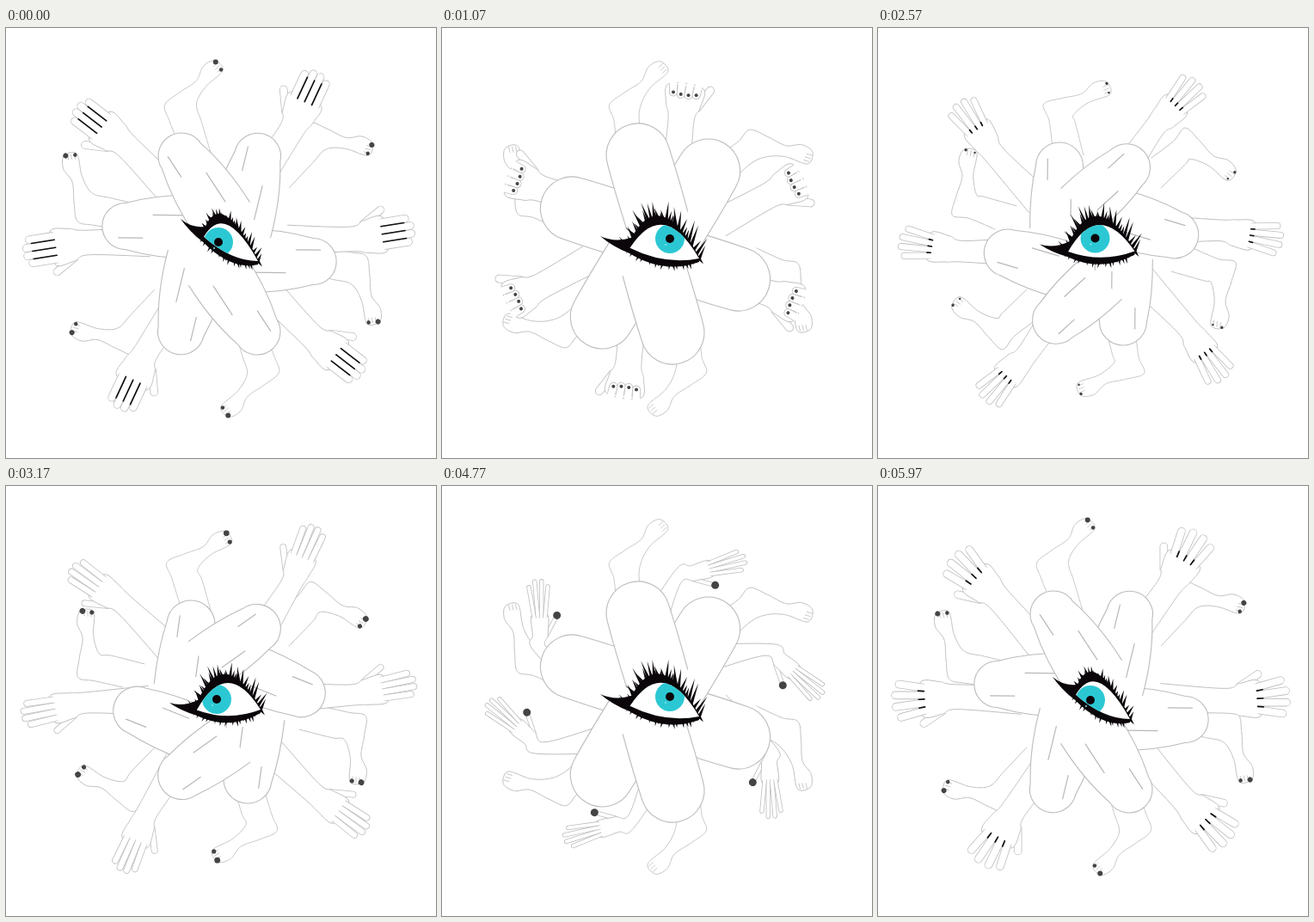
These frames come from a looping animation (500x500 px, 6.07 s). An HTML page with a canvas:

```html
<!DOCTYPE html>
<html lang="en">
<head>
<meta charset="utf-8">
<title>Eye mandala</title>
<style>
  html, body { margin: 0; height: 100%; overflow: hidden; background: #fff; }
  canvas { display: block; width: 100vw; height: 100vh; }
</style>
</head>
<body>
<canvas id="stage" width="500" height="500"></canvas>
<script>
const ctx = document.getElementById('stage').getContext('2d');
const LOOP = 6070, FIRST = 70, STEP = 100, ARM_CYCLE = 30.5;
const INK = '#0a060a', RAD = Math.PI / 180;

// Legs: heel position, foot angle, knee circle, and how far the hip has swung over.
const bent = { heel: 186, foot: -35, x: 204, y: 149, r: 27, swing: 0, nail: 3, crease: 1 };
const plump = { heel: 196, foot: -34, x: 228, y: 148, r: 37, swing: 0, nail: 0, crease: 0 };
const sole = { heel: 201, foot: -5, x: 207, y: 160, r: 27, swing: .8, nail: 0, crease: 1 };
const turned = { heel: 189, foot: -21, x: 215, y: 161, r: 28, swing: 1, nail: 3.4, crease: 1 };
const wide = { heel: 198, foot: -32, x: 199, y: 163, r: 33, swing: 1, nail: 2.8, crease: 1 };
const legKeys = [[0, bent], [11, plump], [20, sole], [32, turned], [40, wide], [48, plump], [60, bent]];

// Hands: wrist, direction, finger length, half width, spread, thumb side, dark gaps.
const back = { x: 335, y: 112, dir: -65, len: 34, half: 19, spread: 0, thumb: -1, gap: 1 };
const flat = { x: 333, y: 110, dir: -67, len: 37, half: 15, spread: 2, thumb: -1, gap: 0 };
const fist = { x: 279, y: 100, dir: -82, len: -9, half: 20, spread: 5, thumb: 1, gap: 0 };
const reach = { x: 279, y: 98, dir: -83, len: 42, half: 15, spread: 4, thumb: 1, gap: 0 };
const side = { x: 282, y: 104, dir: -15, len: 44, half: 9, spread: 5, thumb: 1, gap: 0 };
const slim = { x: 300, y: 111, dir: -25, len: 38, half: 9, spread: 4, thumb: 1, gap: 0 };
const palm = { x: 341, y: 112, dir: -60, len: 34, half: 19, spread: 8, thumb: -1, gap: .25 };
const armKeys = [[0, back], [1.5, flat], [9.5, fist], [11, fist], [14, reach],
  [17.5, side], [20, slim], [29.5, palm], [ARM_CYCLE, back]];

// Eye: wing tip, right corner, iris, lash length.
const tilted = { lx: 203, ly: 222, rx: 293, ry: 271, ix: 247, iy: 249, lash: 14 };
const open = { lx: 184, ly: 242, rx: 299, ry: 268, ix: 265, iy: 245, lash: 24 };
const level = { lx: 186, ly: 251, rx: 301, ry: 259, ix: 260, iy: 241, lash: 24 };
const left = { lx: 190, ly: 252, rx: 296, ry: 260, ix: 245, iy: 248, lash: 20 };
const eyeKeys = [[0, tilted], [11, open], [20, level], [32, left], [40, level], [48, open], [60, tilted]];

const mix = (a, b, u) => a + (b - a) * u;
const noise = i => { const s = Math.sin(i * 127.1 + 3.7) * 43758.5; return s - Math.floor(s); };

function poseAt(keys, n) {
  let i = 0;
  while (i < keys.length - 2 && keys[i + 1][0] <= n) i++;
  const [n0, a] = keys[i], [n1, b] = keys[i + 1], pose = {};
  for (const k in a) pose[k] = mix(a[k], b[k], (n - n0) / (n1 - n0));
  return pose;
}

// Local frame: maps (along, across) to the stage.
function frame(x, y, angle) {
  const c = Math.cos(angle), s = Math.sin(angle);
  return (u, v) => [x + u * c - v * s, y + u * s + v * c];
}

// Catmull-Rom curve through points.
function curve(pts) {
  const at = i => pts[Math.max(0, Math.min(pts.length - 1, i))];
  ctx.beginPath();
  ctx.moveTo(...pts[0]);
  for (let i = 0; i < pts.length - 1; i++) {
    const a = at(i - 1), b = at(i), c = at(i + 1), d = at(i + 2);
    ctx.bezierCurveTo(
      b[0] + (c[0] - a[0]) / 6, b[1] + (c[1] - a[1]) / 6,
      c[0] - (d[0] - b[0]) / 6, c[1] - (d[1] - b[1]) / 6, ...c);
  }
}

function skin(color, width) {
  ctx.fillStyle = '#fff';
  ctx.fill();
  ctx.strokeStyle = color;
  ctx.lineWidth = width;
  ctx.stroke();
}

function line(a, b, color, width) {
  ctx.beginPath();
  ctx.moveTo(...a);
  ctx.lineTo(...b);
  ctx.strokeStyle = color;
  ctx.lineWidth = width;
  ctx.stroke();
}

function dot([x, y], r, color) {
  if (r < .3) return;
  ctx.beginPath();
  ctx.arc(x, y, r, 0, 7);
  ctx.fillStyle = color;
  ctx.fill();
}

function turn(degrees, cx, cy, draw, pose) {
  ctx.save();
  ctx.translate(cx, cy);
  ctx.rotate(degrees * RAD);
  ctx.translate(-cx, -cy);
  draw(pose);
  ctx.restore();
}

function foot({ heel, foot, nail }) {
  const at = frame(heel, 86, foot * RAD);
  curve([[203, 140], [heel + 4, 108], at(-3, 2), at(19, 0), at(43, 0), at(59, -9), at(74, -7),
    at(75, 8), at(48, 12), at(28, 22), [mix(heel, 238, .8), 110], [239, 148]]);
  ctx.setLineDash([1.6, .8]);
  skin('#b8b8b8', .8);
  ctx.setLineDash([]);
  for (const v of [-3, 1, 5]) line(at(75, v), at(69, v + 1), '#b8b8b8', .7);
  dot(at(74, -5), nail, '#444');
  dot(at(74, 6), nail * .75, '#444');
}

function thigh({ x, y, r, swing, crease }) {
  const hx = mix(248, 206, swing), hy = mix(216, 226, swing), hr = mix(37, 33, swing);
  const a = Math.atan2(y - hy, x - hx), d = Math.hypot(x - hx, y - hy);
  const at = frame(hx, hy, a);
  ctx.beginPath();
  ctx.moveTo(...at(-8, -hr));
  ctx.quadraticCurveTo(...at(d * .5, -hr - 1), ...at(d, -r));
  ctx.arc(x, y, r, a - Math.PI / 2, a + Math.PI / 2);
  ctx.quadraticCurveTo(...at(d * .5, hr + 1), ...at(-8, hr));
  skin('#bcbcbc', 1.1);
  ctx.globalAlpha = crease;
  line(at(d * .75, -r * .5), at(d + r * .3, -r * .5), '#b8b8b8', 1.2);
  line(at(d * .1, r * .5), at(d * .6, r * .5), '#b8b8b8', 1.2);
  ctx.globalAlpha = 1;
}

function arm({ x, y, dir, len, half, spread, thumb, gap }) {
  const at = frame(x, y, dir * RAD), wrist = half * .55 + 4;
  const ex = mix(x, 248, .5) - (dir + 65) / 2, ey = mix(y, 248, .5);
  const elbow = frame(ex, ey, Math.atan2(y - ey, x - ex));
  const gray = '#bebebe', wide = half * .42 + .8;

  const finger = (base, angle, length, nail) => {
    const f = frame(...base, (dir + angle) * RAD);
    line(f(0, 0), f(length, 0), gray, wide + .8);
    line(f(-3 * Math.sign(length), 0), f(length, 0), '#fff', wide - .8);
    dot(f(length, 0), nail, '#444');
    return f;
  };

  finger(at(9, thumb * half * .8), thumb * 30, 26, Math.min(4.5, Math.max(0, (15 - half) * .75)));
  curve([elbow(0, -17), at(-8, -wrist), at(10, -half), at(33, -half),
    at(33, half), at(10, half), at(-8, wrist), elbow(0, 17)]);
  skin(gray, .9);
  for (let i = 0; i < 4; i++) {
    const v = i - 1.5, length = len * (1 - .14 * Math.abs(v));
    finger(at(31, v * half * .48), v * spread, length, Math.max(0, Math.min(2, 1 - len / 4)));
  }
  if (gap < .08) return;
  for (let v = -1; v <= 1; v++) {
    const f = frame(...at(29, v * half * .48), (dir + v * spread) * RAD);
    line(f(0, 0), f(27 * gap, 0), '#111', 1.7);
  }
}

function eye({ lx, ly, rx, ry, ix, iy, lash }) {
  const ax = mix(lx, rx, .3), ay = mix(ly, ry, .3) + 6;
  const mx = (ax + rx) / 2, my = (ay + ry) / 2;
  const up = [258 * 2 - mx, 229 * 2 - my], low = [mx, my + 14];
  const along = (c, u) => [0, 1].map(k =>
    (1 - u) ** 2 * [ax, ay][k] + 2 * u * (1 - u) * c[k] + u * u * [rx, ry][k]);

  const lashes = (c, count, from, to, len) => {
    ctx.fillStyle = INK;
    for (let i = 0; i < count; i++) {
      const u = i / (count - 1), a = mix(from, to, u) + (noise(i + count) - .5) * .5;
      const at = frame(...along(c, u), a);
      ctx.beginPath();
      ctx.moveTo(...at(-2, -2.2));
      ctx.lineTo(...at(len * mix(.4, 1.15, noise(i * 3 + count)), 0));
      ctx.lineTo(...at(-2, 2.2));
      ctx.fill();
    }
  };
  lashes([up[0] - 3, up[1] - 10], 30, -2.35, -1, lash);
  lashes([low[0], low[1] + 7], 22, 2.1, 1.1, 9);

  // Wing with both lid bands
  ctx.beginPath();
  ctx.moveTo(lx, ly);
  ctx.quadraticCurveTo(mix(lx, ax, .5), mix(ly, ay, .5) + 1, ax + 2, ay - 12);
  ctx.quadraticCurveTo(up[0] - 4, up[1] - 13, rx, ry - 2);
  ctx.lineTo(rx, ry + 4);
  ctx.quadraticCurveTo(low[0], low[1] + 11, ax - 1, ay + 6);
  ctx.quadraticCurveTo(mix(lx, ax, .4), mix(ly, ay, .5) + 5, lx, ly);
  ctx.fill();

  ctx.save();
  ctx.beginPath();
  ctx.moveTo(ax, ay);
  ctx.quadraticCurveTo(...up, rx, ry);
  ctx.quadraticCurveTo(...low, ax, ay);
  ctx.fillStyle = '#fff';
  ctx.fill();
  ctx.clip();
  dot([ix, iy], 17, '#2bc8d4');
  ctx.restore();
  dot([ix, iy], 5, INK);
  dot([ix - 5, iy + 7], 1, '#8be6ec');
}

function draw(n) {
  const leg = poseAt(legKeys, n), hand = poseAt(armKeys, n % ARM_CYCLE);
  const swung = leg.swing > .4;
  const armTurns = [0, 56, 102.5], thighTurns = [0, 47, 124 - 20 * leg.swing];
  ctx.fillStyle = '#fff';
  ctx.fillRect(0, 0, 500, 500);
  ctx.lineCap = ctx.lineJoin = 'round';
  for (let k = 0; k < 6; k++) turn(k * 60, 251, 245, foot, leg);
  for (const half of [0, 180])
    for (const a of armTurns) turn(a + half, 247.5, 247.5, arm, hand);
  for (const k of swung ? [0, 2, 1] : [2, 1, 0])
    for (const half of [0, 180]) turn(thighTurns[k] + half, 248, 251, thigh, leg);
  eye(poseAt(eyeKeys, n));
}

const start = performance.now();
let shown = -1;
function tick() {
  const t = (performance.now() - start) % LOOP;
  const n = t < FIRST ? 0 : 1 + Math.floor((t - FIRST) / STEP);
  if (n !== shown) draw(shown = n);
  requestAnimationFrame(tick);
}
tick();
</script>
</body>
</html>
```
